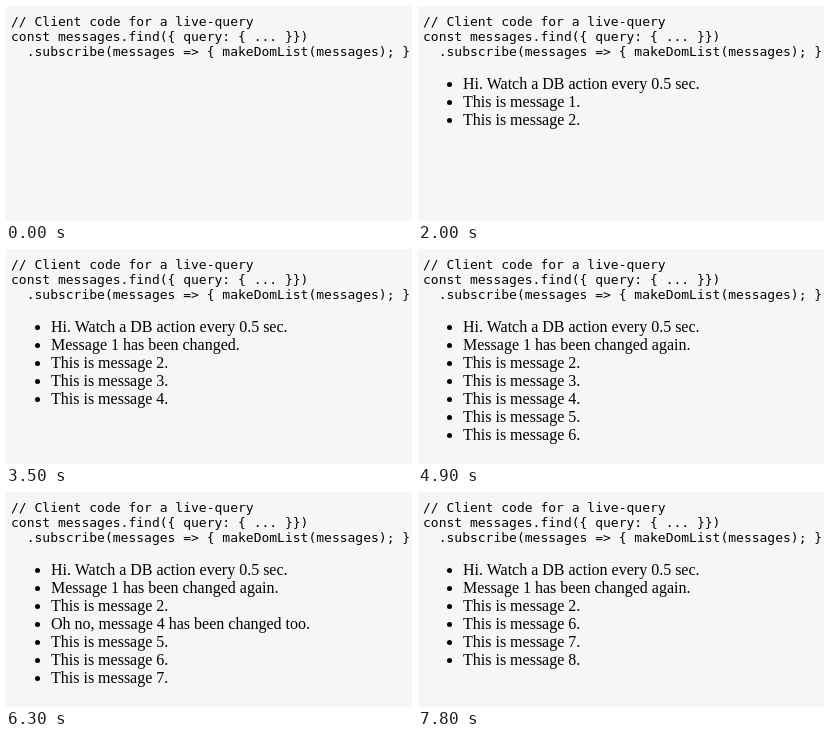
An HTML page that plays this animation: 406x215 px, repeating every 8 s.

```html
<!DOCTYPE html>
<html lang="en">
<head>
<meta charset="utf-8">
<title>Live query</title>
<style>
  html, body { margin: 0; width: 100%; height: 100%; overflow: hidden; background: #f6f6f6; color: #000; }
  pre, ul { position: absolute; margin: 0; }
  pre { left: 5px; top: 8px; font: 13px/15px "DejaVu Sans Mono", monospace; }
  ul { left: 5px; top: 69px; padding-left: 40px; font: 16px/18px "Liberation Serif", serif; white-space: nowrap; }
</style>
</head>
<body>
<pre>// Client code for a live-query
const messages.find({ query: { ... }})
  .subscribe(messages =&gt; { makeDomList(messages); }</pre>
<ul id="list"></ul>
<script>
const LOOP = 8000;
const list = document.getElementById('list');
const message = id => `This is message ${id}.`;

// Database actions: [time in ms, id, text]; without text the row is removed
const actions = [
  [1300, 0, 'Hi. Watch a DB action every 0.5 sec.'],
  [1600, 1, message(1)],
  [2000, 2, message(2)],
  [2600, 1, 'Message 1 has been changed.'],
  [3000, 3, message(3)],
  [3500, 4, message(4)],
  [3900, 5, message(5)],
  [4500, 1, 'Message 1 has been changed again.'],
  [4900, 6, message(6)],
  [5400, 4, 'Oh no, message 4 has been changed too.'],
  [5800, 7, message(7)],
  [6300, 3],
  [6800, 4],
  [7200, 5],
  [7800, 8, message(8)],
];

let shown = 0;

function render(count) {
  const rows = new Map();
  for (const [, id, text] of actions.slice(0, count)) {
    if (text) rows.set(id, text);
    else rows.delete(id);
  }
  list.replaceChildren(...Array.from(rows.values(), text => {
    const item = document.createElement('li');
    item.textContent = text;
    return item;
  }));
}

function tick() {
  const time = performance.now() % LOOP;
  const count = actions.filter(([at]) => at <= time).length;
  if (count !== shown) render(shown = count);
  requestAnimationFrame(tick);
}
tick();
</script>
</body>
</html>
```
